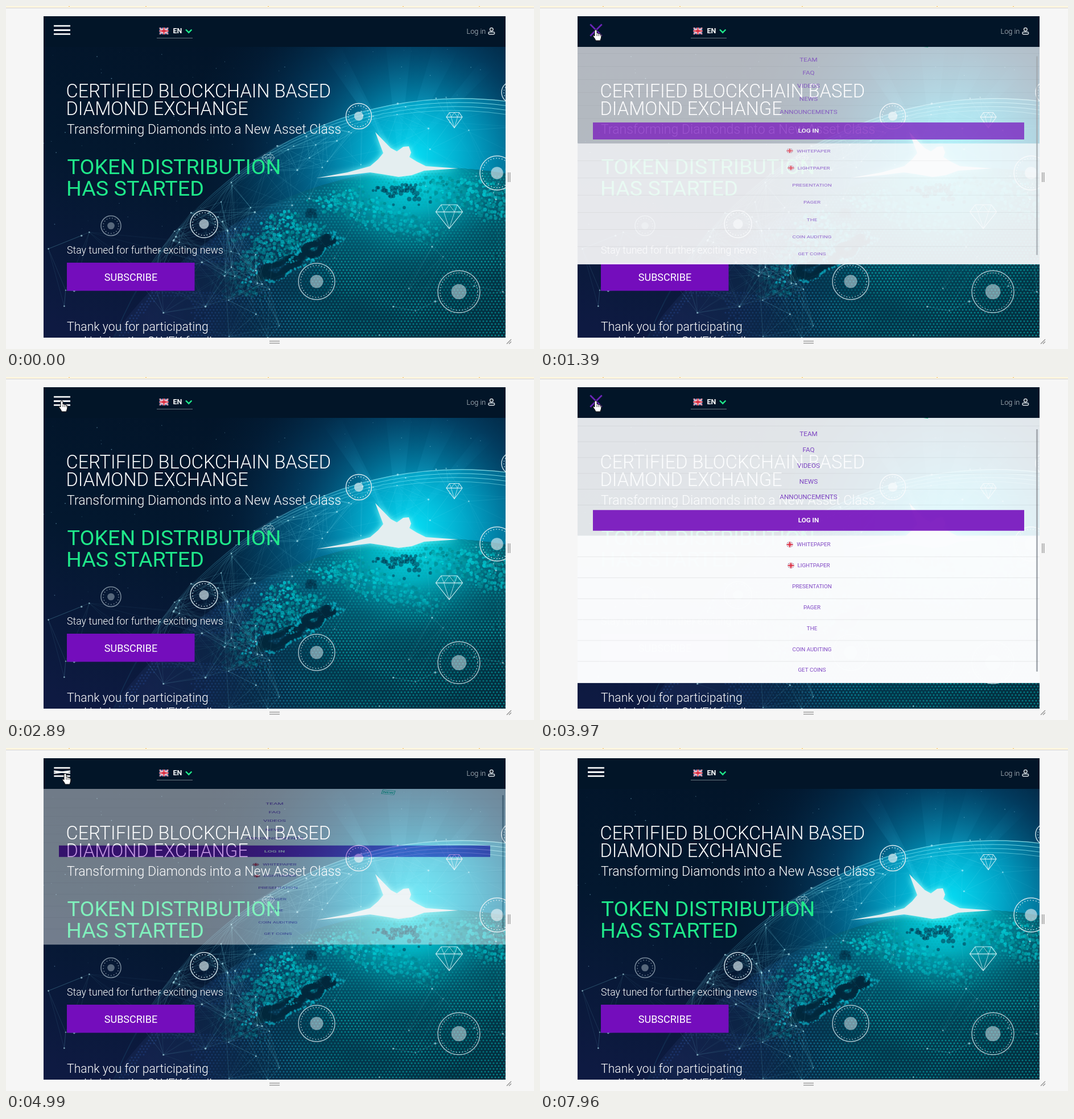
Animation of 928 by 604 pixels, one loop 7.99 s. Source, as an HTML page with a canvas:

```html
<!DOCTYPE html>
<html lang="en">
<head>
<meta charset="utf-8">
<title>Landing page menu</title>
<style>
html, body { margin: 0; width: 100%; height: 100%; overflow: hidden; background: #f6f6f6; }
canvas { display: block; }
</style>
</head>
<body>
<canvas id="stage" width="928" height="604"></canvas>
<script>
const W = 928, H = 604, LOOP = 7990, TAU = Math.PI * 2;
const PAGE = { x: 66, y: 18, w: 812, h: 566 };
const MENU_TOP = 72, PURPLE = '#740dbc', GREEN = '#1fe88a';
const ctx = document.getElementById('stage').getContext('2d');

let seed = 11;
const rnd = (a = 0, b = 1) => {
  seed = (seed * 16807) % 2147483647;
  return a + (b - a) * seed / 2147483647;
};
const clamp = v => Math.max(0, Math.min(1, v));
const smooth = u => u * u * (3 - 2 * u);

function layer() {
  const c = document.createElement('canvas');
  c.width = W; c.height = H;
  return c.getContext('2d');
}
function rect(g, color, x, y, w, h) { g.fillStyle = color; g.fillRect(x, y, w, h); }
function disc(g, color, x, y, r) {
  g.fillStyle = color;
  g.beginPath(); g.arc(x, y, r, 0, TAU); g.fill();
}
function ring(g, x, y, r) { g.beginPath(); g.arc(x, y, r, 0, TAU); g.stroke(); }
function poly(g, pts, close) {
  g.beginPath();
  for (let i = 0; i < pts.length; i += 2) g.lineTo(pts[i], pts[i + 1]);
  if (close) g.closePath();
}
function line(g, color, width, ...pts) {
  g.strokeStyle = color; g.lineWidth = width;
  poly(g, pts); g.stroke();
}
function text(g, str, x, y, size, color = '#fff', weight = 300, align = 'left') {
  g.font = `${weight} ${size}px Roboto, sans-serif`;
  g.fillStyle = color; g.textAlign = align;
  g.fillText(str, x, y);
}
function stops(gradient, ...list) {
  list.forEach(([at, color]) => gradient.addColorStop(at, color));
  return gradient;
}
const radial = (g, x, y, r, ...list) => stops(g.createRadialGradient(x, y, 0, x, y, r), ...list);
const linear = (g, x0, y0, x1, y1, ...list) => stops(g.createLinearGradient(x0, y0, x1, y1), ...list);

// ---------- flags ----------
function flag(g, code, x, y, w = 16, h = 12) {
  g.save();
  g.beginPath(); g.rect(x, y, w, h); g.clip();
  const cx = x + w / 2, cy = y + h / 2;
  if (code === 'EN') {
    rect(g, '#25347c', x, y, w, h);
    for (const [color, d, s] of [['#fff', 2.4, 4.4], ['#d8253a', .9, 2.2]]) {
      line(g, color, d, x, y, x + w, y + h);
      line(g, color, d, x + w, y, x, y + h);
      rect(g, color, cx - s / 2, y, s, h);
      rect(g, color, x, cy - s / 2, w, s);
    }
  } else if (code === 'RU') {
    ['#fff', '#1b35c8', '#d8202a'].forEach((c, i) => rect(g, c, x, y + i * h / 3, w, h / 3));
  } else if (code === 'PT') {
    rect(g, '#1c9a3c', x, y, w, h);
    poly(g, [x + 1, cy, cx, y + 1, x + w - 1, cy, cx, y + h - 1]);
    g.fillStyle = '#f6d22a'; g.fill();
    disc(g, '#243a8c', cx, cy, 2.6);
  } else if (code === 'ZH') {
    rect(g, '#de2a16', x, y, w, h);
    disc(g, '#f8d030', x + 4, y + 4, 1.6);
  } else {
    rect(g, '#fff', x, y, w, h);
    disc(g, '#c81f38', cx, cy, 3.3);
    if (code === 'KO') {
      rect(g, '#24408e', cx - 3, cy, 6, 2.6);
      for (const [a, b] of [[1, 1], [w - 4, 1], [1, h - 3], [w - 4, h - 3]]) rect(g, '#333', x + a, y + b, 3, 2);
    }
  }
  g.restore();
}

// ---------- static page ----------
function drawSky(g) {
  rect(g, linear(g, 380, 18, 200, 600, [0, '#021428'], [.5, '#03182f'], [1, '#0e1a42']), 0, 0, W, H);
  rect(g, radial(g, 720, 260, 400, [0, '#00d0ee'], [.22, '#00a8d2c8'], [.5, '#02689c78'], [.8, '#043c6828'], [1, '#04305000']), 0, 0, W, H);
  for (const [x, y, w] of [[570, 75, 20], [690, 55, 24], [775, 70, 24], [600, 130, 12], [850, 100, 18]]) {
    poly(g, [690, 275, x - w, y, x + w, y]);
    g.fillStyle = linear(g, 690, 275, x, y, [0, '#4fe4ff40'], [1, '#20a0d000']);
    g.fill();
  }
  for (let i = 0; i < 110; i++) disc(g, `rgba(150,215,240,${rnd(.1, .6)})`, rnd(66, 878), rnd(76, 400), rnd(.3, .9));
}

function drawGlobe(g) {
  const air = { x: 800, y: 815, r: 652 }, land = { x: 760, y: 985, r: 700 };
  g.save();
  g.beginPath(); g.arc(air.x, air.y, air.r, 0, TAU); g.clip();
  rect(g, radial(g, 720, 275, 400, [0, '#08e0f4c0'], [.4, '#00a8d068'], [.75, '#02709838'], [1, '#04386800']), 0, 0, W, H);
  g.restore();
  g.strokeStyle = linear(g, 250, 0, 878, 0, [0, '#30a0c010'], [.5, '#90f0ff78'], [1, '#b0ffffb0']);
  for (let i = 0; i < 4; i++) {
    g.lineWidth = 1.4 - i * .25;
    ring(g, air.x - i * 5, air.y + i * 4, air.r - i * 3);
  }

  g.save();
  g.beginPath(); g.arc(land.x, land.y, land.r, 0, TAU); g.clip();
  rect(g, linear(g, 200, 0, 880, 0, [0, '#1a286000'], [.25, '#12386880'], [.5, '#04405c'], [1, '#033040']), 0, 0, W, H);
  rect(g, radial(g, 250, 550, 190, [0, '#3a2f8c70'], [1, '#3a2f8c00']), 0, 0, W, H);
  rect(g, radial(g, 710, 290, 340, [0, '#08e4f0'], [.2, '#00c4d4d8'], [.45, '#0094aa78'], [1, '#00708000']), 0, 0, W, H);
  rect(g, linear(g, 0, 360, 0, 480, [0, '#02203000'], [1, '#02203070']), 0, 0, W, H);
  const noise = (x, y) => Math.sin(x * .031 + Math.sin(y * .043) * 2) + Math.sin(y * .057 - x * .021) * .8 + Math.sin(x * .09 + y * .07) * .35;
  for (let y = 290, row = 0; y < 586; y += 5, row++) {
    for (let x = 200 + row % 2 * 3; x < 880; x += 6) {
      const depth = land.r - Math.hypot(x - land.x, y - land.y);
      if (depth < 4) continue;
      const n = noise(x, y), east = clamp((x - 330) / 260), fade = smooth(clamp((x - 350) / 150));
      const coast = depth > 18 && depth < 90 + n * 26 + rnd(-14, 14);
      if (coast && n > -.4) {
        const shade = Math.round(rnd(120, 215));
        disc(g, `rgba(0,${shade},${shade + 8},${(.85 - depth / 260) * fade})`, x + rnd(-3, 3), y + rnd(-3, 3), rnd(1.6, 3.6));
      } else if (coast && n < -1) {
        disc(g, `rgba(3,42,66,${.5 * fade})`, x + rnd(-3, 3), y, rnd(2, 4.5));
      } else {
        disc(g, `rgba(${Math.round(50 - 45 * east)},${Math.round(95 + 75 * east)},${Math.round(180 - 5 * east)},${.28 + .28 * east + n * .1})`, x, y, 1.6);
      }
    }
  }
  // island shores around dark water
  for (const [cx, cy, rx, ry] of [[478, 462, 52, 17], [545, 425, 40, 15]]) {
    for (let i = 0; i < 90; i++) {
      const a = i / 90 * TAU, k = 1 + .25 * Math.sin(a * 5) + rnd(-.12, .12);
      const dx = Math.cos(a) * k, dy = Math.sin(a) * k;
      disc(g, '#02283c80', cx + dx * rx * .6, cy + dy * ry * .6 - dx * 12, 6);
      disc(g, '#08b0c4a0', cx + dx * rx, cy + dy * ry - dx * 16, rnd(1, 2.8));
    }
  }
  g.restore();
}

function drawNetwork(g) {
  const nodes = [];
  for (let i = 0; i < 72; i++) {
    const a = rnd(-2.65, -1.4), r = 655 - Math.pow(rnd(), 2) * 190;
    nodes.push([800 + Math.cos(a) * r, 815 + Math.sin(a) * r]);
  }
  for (let i = 0; i < 32; i++) nodes.push([rnd(70, 878), rnd(390, 590)]);
  nodes.forEach(([x, y], i) => {
    nodes.slice(i + 1).forEach(([u, v]) => {
      const d = Math.hypot(x - u, y - v);
      if (d < 150 && rnd() < .4) line(g, `rgba(130,225,240,${.34 - d / 520})`, .7, x, y, u, v);
    });
    disc(g, '#c8f8ff90', x, y, rnd(.8, 1.9));
  });
}

function drawSun(g) {
  g.save();
  g.shadowColor = '#90ffff'; g.shadowBlur = 12;
  g.fillStyle = '#e4eef0';
  poly(g, [545, 303, 600, 293, 640, 282, 654, 270, 663, 259, 649, 222, 676, 250, 687, 256, 698, 248,
    708, 247, 712, 258, 709, 266, 722, 274, 738, 282, 795, 286, 735, 290, 713, 298, 690, 301, 660, 296, 640, 293, 600, 298], true);
  g.fill();
  g.restore();
}

// The emblem on each coin is a plain disc.
function coin(g, x, y, r, alpha) {
  g.save();
  g.globalAlpha = alpha;
  g.strokeStyle = '#d8e8ee'; g.lineWidth = 1.5;
  ring(g, x, y, r);
  g.setLineDash([1.5, 3.5]); ring(g, x, y, r - 4);
  g.globalAlpha = alpha * .7;
  disc(g, '#d8e8ee', x, y, r * .36);
  g.restore();
}
function diamond(g, x, y, w, h, alpha) {
  g.save();
  g.translate(x, y); g.globalAlpha = alpha;
  const a = w / 2, t = -h / 2, m = t + h * .3;
  line(g, '#e0f4f8', 1.1, -a, m, -a * .6, t, a * .6, t, a, m, 0, h / 2, -a, m, a, m);
  line(g, '#e0f4f8', .8, -a * .6, t, -a * .4, m, 0, t, a * .4, m, a * .6, t);
  line(g, '#e0f4f8', .8, -a * .4, m, 0, h / 2, a * .4, m);
  g.restore();
}

function drawChrome(g) {
  rect(g, '#f6f6f6', 0, 0, W, H);
  rect(g, '#fff6df', 0, 0, W, 3);
  rect(g, '#d2d2d2', 0, 3, W, 1);
  for (const x of [110, 245, 460, 697, 831]) rect(g, '#e8b050', x, 0, 2, 1);
  rect(g, '#9a9a9a', 882, 293, 1.4, 17);
  rect(g, '#9a9a9a', 885, 293, 1.4, 17);
  rect(g, '#9a9a9a', 463, 589.5, 18, 1.4);
  rect(g, '#9a9a9a', 463, 593, 18, 1.4);
  line(g, '#909090', 1.2, 880, 595, 888, 587);
  line(g, '#909090', 1.2, 884, 595, 888, 591);
}

function drawPage(g) {
  drawChrome(g);
  g.save();
  g.beginPath(); g.rect(PAGE.x, PAGE.y, PAGE.w, PAGE.h); g.clip();
  drawSky(g); drawGlobe(g); drawNetwork(g); drawSun(g);
  rect(g, '#021528', PAGE.x, PAGE.y, PAGE.w, 54);

  [[620, 194, 22.5, 1], [863, 294, 30, .95], [348, 384, 24, .95], [184.5, 387, 17.5, .55],
    [546, 485, 32, .75], [796, 503, 37, .75], [890, 152, 19, .9]].forEach(c => coin(g, ...c));
  diamond(g, 788, 201, 28, 27, .9);
  diamond(g, 779, 371, 47, 42, .9);
  diamond(g, 461, 271, 22, 19, .5);

  text(g, 'CERTIFIED BLOCKCHAIN BASED', 105.5, 161, 32.6);
  text(g, 'DIAMOND EXCHANGE', 105.5, 191.5, 32.6);
  text(g, 'Transforming Diamonds into a New Asset Class', 107, 224.5, 23.05);
  text(g, 'TOKEN DISTRIBUTION', 107.5, 296, 37.7, GREEN, 400);
  text(g, 'HAS STARTED', 106, 334, 37.7, GREEN, 400);
  text(g, 'Stay tuned for further exciting news', 107, 436, 17.7);
  rect(g, PURPLE, 107, 452, 224.5, 49.5);
  text(g, 'SUBSCRIBE', 219.5, 484, 18, '#fff', 400, 'center');
  text(g, 'Thank you for participating', 107, 572, 21.2);
  text(g, 'and joining the OLVEK family', 107, 598, 21.2);

  flag(g, 'EN', 269.5, 38);
  text(g, 'EN', 293.5, 48, 12.5, '#fff', 700);
  line(g, GREEN, 2.4, 316, 41.5, 321.2, 46.7, 326.4, 41.5);
  rect(g, '#6b7680', 265, 56, 63, 1);
  text(g, 'Log in', 809.5, 49, 12.7, '#c3cad0');
  g.strokeStyle = '#d4dade'; g.lineWidth = 1.5;
  ring(g, 853.3, 41.2, 2.8);
  g.beginPath(); g.roundRect(848, 45.7, 10.6, 4, 2); g.stroke();
  g.restore();
}

const page = layer(), sheet = layer();
drawPage(page);

// ---------- slide-down menu ----------
const LINKS = ['TEAM', 'FAQ', 'VIDEOS', 'NEWS', 'ANNOUNCEMENTS'];
const PAPERS = ['WHITEPAPER', 'LIGHTPAPER', 'PRESENTATION', 'PAGER', 'THE', 'COIN AUDITING', 'GET COINS'];
const ROW = 40.4, SPLIT = 227.5;

function drawItems(g, pad) {
  const ink = '#7030bd';
  rect(g, '#a2a8ae', 872, 22, 3, 468);
  g.translate(0, pad);
  LINKS.forEach((s, i) => {
    rect(g, '#00000012', PAGE.x, 15 + i * 30.6, PAGE.w, 1);
    text(g, s, 472, 34.9 + i * 30.6, 11.7, ink, 400, 'center');
  });
  rect(g, '#00000012', PAGE.x, 168, PAGE.w, 1);
  rect(g, PURPLE, 93, 178, 758, 40);
  text(g, 'LOG IN', 472, 202, 11.7, '#fff', 700, 'center');
  PAPERS.forEach((s, i) => {
    const y = SPLIT + 17.2 + i * ROW;
    if (i) rect(g, '#00000018', PAGE.x, SPLIT + i * ROW, PAGE.w, 1);
    text(g, s, i < 2 ? 481 : 478, y + 3.7, 9.8, ink, 400, 'center');
    if (i > 1) return;
    g.save();
    g.beginPath(); g.arc(439 + i * 2, y, 5.5, 0, TAU); g.clip();
    flag(g, 'EN', 433 + i * 2, y - 6, 12, 12);
    g.restore();
  });
  g.save();
  g.translate(672, -8); g.rotate(.18);
  g.strokeStyle = '#18b880'; g.lineWidth = 1; g.strokeRect(-11, -7, 22, 14);
  text(g, 'NEW', 0, 3.5, 9, '#18b880', 700, 'center');
  g.restore();
}

function drawMenu(size, closing, scroll) {
  if (size <= 0) return;
  const height = (512 + 33 * scroll) * size, alpha = Math.pow(size, 1.2);
  sheet.save();
  sheet.clearRect(0, 0, W, H);
  sheet.beginPath(); sheet.rect(PAGE.x, MENU_TOP, PAGE.w, Math.min(height, 512)); sheet.clip();
  if (closing) rect(sheet, '#fcfdfe', 0, 0, W, H);
  sheet.translate(0, MENU_TOP); sheet.scale(1, size);
  drawItems(sheet, 20 * scroll);
  sheet.restore();

  ctx.save();
  ctx.beginPath(); ctx.rect(PAGE.x, MENU_TOP, PAGE.w, 512); ctx.clip();
  ctx.globalAlpha = alpha;
  if (!closing) {
    const split = SPLIT * size;
    rect(ctx, '#fcfdfe', PAGE.x, MENU_TOP, PAGE.w, height);
    rect(ctx, '#fcfdfe', PAGE.x, MENU_TOP + split, PAGE.w, height - split);
  }
  ctx.drawImage(sheet.canvas, 0, 0);
  ctx.restore();
}

function drawBurger(cross) {
  ctx.save();
  ctx.translate(98.5, 42.5);
  const color = cross > .6 ? '#6a24b8' : '#fff', half = 14.5 * (1 - cross * cross);
  if (half > 0) for (const y of [-7.5, 7]) line(ctx, '#fff', 2.6, -half, y, half, y);
  for (const side of [-1, 1]) {
    ctx.save();
    ctx.rotate(side * cross * Math.PI / 4);
    line(ctx, color, 2.6, -14.5, 0, 14.5, 0);
    ctx.restore();
  }
  ctx.restore();
}

// ---------- language list ----------
function drawLanguages(hoverY) {
  rect(ctx, '#021528', 265, 55, 49.5, 107);
  ['RU', 'JA', 'PT', 'ZH', 'KO'].forEach((code, i) => {
    const y = 65.5 + i * 21.6;
    const hovered = Math.floor((hoverY - 54.5) / 21.6) === i;
    flag(ctx, code, 269.5, y - 5.5);
    text(ctx, code, 293.5, y + 4, 12.5, hovered ? GREEN : '#fff', hovered ? 400 : 700);
  });
}

// ---------- pointer ----------
const PATH = [[460, -6, 6], [940, 97, 42], [4400, 97, 42], [4630, 103, 45], [5050, 103, 45], [5680, 312, 50],
  [6130, 311, 50], [6280, 296, 80], [6560, 299, 148], [6910, 312, 52], [7090, 314, 45], [7300, 314, 45], [7960, 932, 250]];

function pointerAt(t) {
  const i = PATH.findIndex(p => p[0] > t);
  if (i < 1) return null;
  const [t0, x0, y0] = PATH[i - 1], [t1, x1, y1] = PATH[i];
  const u = smooth((t - t0) / (t1 - t0));
  return { x: x0 + (x1 - x0) * u, y: y0 + (y1 - y0) * u };
}
function drawPointer({ x, y }) {
  const hand = x > 78 && x < 116;
  ctx.save();
  ctx.translate(x, y);
  poly(ctx, hand
    ? [0, 0, 2, 0, 3, 1, 3, 6, 5, 5.5, 6, 7, 8, 6.5, 9, 8, 10.5, 8, 11, 10, 10.5, 14, 9, 19, 1, 19, -1, 15, -4, 11, -3, 9.5, -1, 11, -1, 1]
    : [0, 0, 0, 14, 3.2, 11, 5.6, 16.4, 8, 15.4, 5.7, 10, 10, 10], true);
  ctx.fillStyle = '#fff'; ctx.fill();
  ctx.strokeStyle = '#111'; ctx.lineWidth = 1; ctx.stroke();
  if (hand) for (const k of [3, 6, 9]) line(ctx, '#111', .8, k, 7, k, 11);
  ctx.restore();
}

// ---------- timeline ----------
const SESSIONS = [[1310, 2680], [3849, 4930]];

function render(t) {
  ctx.drawImage(page.canvas, 0, 0);
  let cross = 0;
  for (const [open, close] of SESSIONS) {
    if (t < open || t > close + 210) continue;
    const closing = t >= close;
    const size = closing
      ? Math.pow(1 - clamp((t - close) / 210), 2)
      : 1 - Math.pow(1 - clamp((t - open) / 220), 3);
    drawMenu(size, closing, open > 3000 ? smooth(clamp((t - 4300) / 330)) : 0);
    cross = closing ? 1 - clamp((t - close) / 72) : clamp((t - open) / 80);
  }
  drawBurger(cross);
  if (t >= 6130 && t < 6970) drawLanguages(pointerAt(t - 60).y);
  const pointer = pointerAt(t);
  if (pointer) drawPointer(pointer);
}

const start = performance.now();
function tick() {
  render((performance.now() - start) % LOOP);
  requestAnimationFrame(tick);
}
tick();
</script>
</body>
</html>
```
